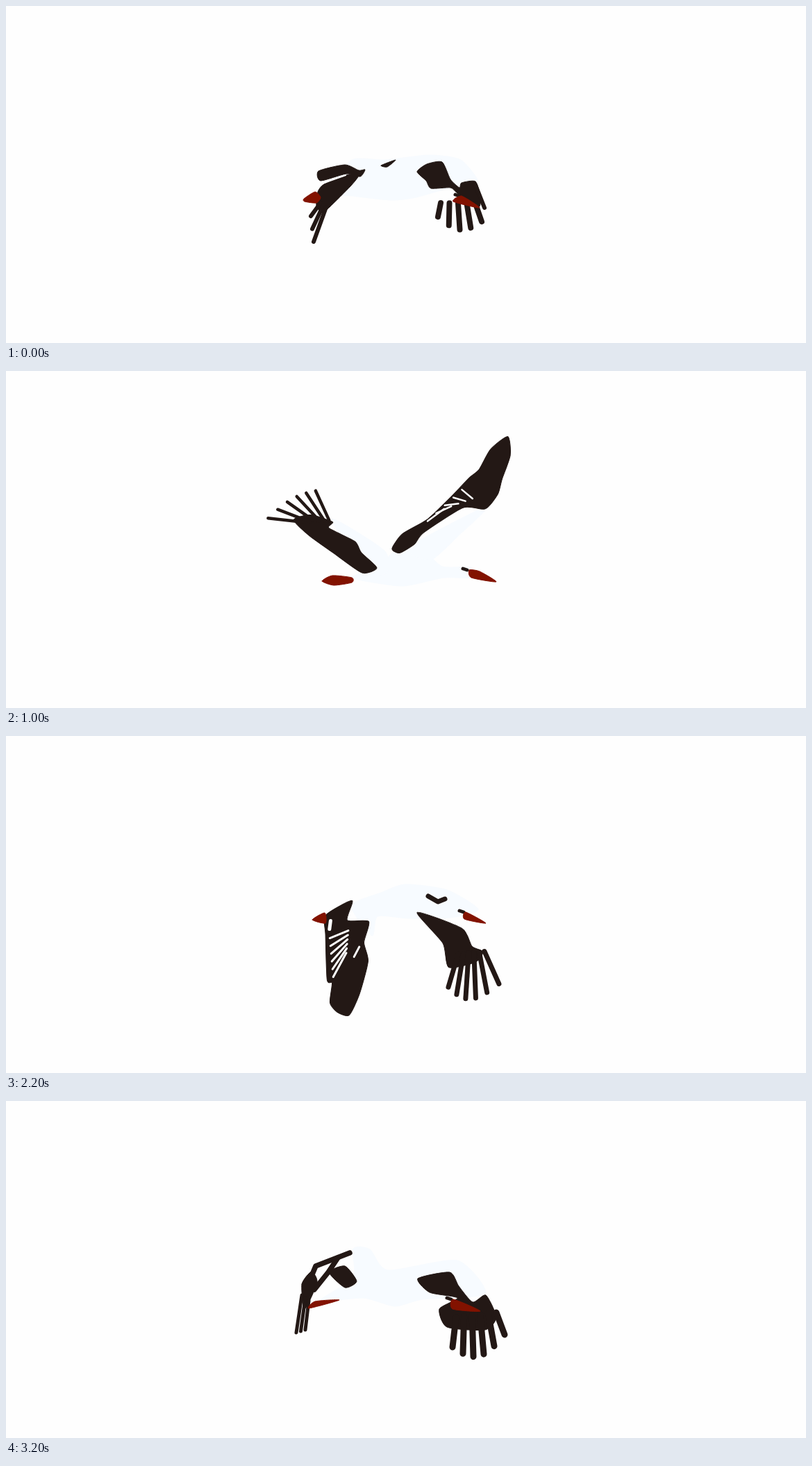
Write an HTML page with a canvas that moves like this. It is 1152x486 px and loops after 3.3 s.

```html
<!DOCTYPE html>
<html lang="en">
<head>
<meta charset="utf-8">
<title>Flying stork</title>
<style>
html, body { margin: 0; width: 100%; height: 100%; overflow: hidden; background: #fefefe; }
canvas { display: block; width: 100%; height: 100%; }
</style>
</head>
<body>
<canvas id="stage" width="1152" height="486"></canvas>
<script>
const ctx = document.getElementById('stage').getContext('2d');
const BLACK = '#231815', RED = '#821200', DOWN = '#f7fbff', PAPER = '#fefefe';
const STEP = 100;
const poses = {};

const mix = (a, b, k) => a + (b - a) * k;

// Closed shape through the given points, with softly rounded sides.
function blob(color, ...p) {
  const n = p.length, at = i => p[(i + n) % n];
  ctx.beginPath();
  ctx.moveTo(p[0], p[1]);
  for (let i = 0; i < n; i += 2) {
    const handle = (j, d) => at(j) + d * (at(j + 2) - at(j - 2)) / 9;
    ctx.bezierCurveTo(handle(i, 1), handle(i + 1, 1), handle(i + 2, -1), handle(i + 3, -1), at(i + 2), at(i + 3));
  }
  ctx.fillStyle = ctx.strokeStyle = color;
  ctx.lineWidth = 1;
  ctx.fill();
  ctx.stroke();
}

function line(color, width, ...p) {
  ctx.beginPath();
  for (let i = 0; i < p.length; i += 2) ctx.lineTo(p[i], p[i + 1]);
  ctx.strokeStyle = color;
  ctx.lineWidth = width;
  ctx.stroke();
}

// Spreads strokes evenly from the first root and tip to the last; sag lowers the middle tips.
function fan(color, count, width, sag, x1, y1, tx1, ty1, x2, y2, tx2, ty2) {
  for (let i = 0; i < count; i++) {
    const k = i / (count - 1);
    line(color, width, mix(x1, x2, k), mix(y1, y2, k),
      mix(tx1, tx2, k), mix(ty1, ty2, k) + sag * Math.sin(Math.PI * k));
  }
}

// The eye patch sits just behind the top of the bill.
function bill(x, y, ...rest) {
  line(BLACK, 5, x - 9, y - 2, x - 3, y);
  blob(RED, x, y, ...rest);
}

function wing(x, degrees, paint) {
  const y = 255;
  ctx.save();
  ctx.translate(x, y);
  ctx.rotate(degrees * Math.PI / 180);
  ctx.translate(-x, -y);
  paint();
  ctx.restore();
}

// Bill tip, natural lift of both wings, then the painters of each part.
function pose(name, x, y, left, right, parts) {
  poses[name] = { values: [left, right, x, y], ...parts };
}

pose('folded', 682, 290, -55, -50, {
  body() {
    blob(DOWN, 462, 268, 498, 222, 545, 222, 610, 215, 655, 222, 680, 255, 640, 262, 590, 276, 555, 280, 500, 274);
    blob(BLACK, 540, 230, 561, 222, 549, 232);
  },
  left() {
    blob(BLACK, 450, 238, 488, 229, 508, 237, 517, 236, 510, 246, 490, 242, 453, 252);
    blob(BLACK, 508, 244, 496, 260, 466, 290, 455, 298, 447, 288, 449, 268, 458, 257, 490, 244);
    line(PAPER, 2, 458, 255, 489, 244);
    fan(BLACK, 3, 6, 0, 453, 284, 439, 303, 461, 290, 443, 340);
  },
  right() {
    blob(BLACK, 592, 239, 606, 228, 628, 225, 640, 250, 653, 262, 656, 255, 676, 253, 683, 276, 680, 290, 650, 270, 640, 262, 612, 263, 605, 252);
    fan(BLACK, 5, 8, 15, 626, 284, 622, 304, 676, 285, 685, 311);
    line(BLACK, 6, 676, 258, 689, 291);
  },
  head() {
    bill(656, 274, 682, 291, 644, 282);
    blob(RED, 429, 278, 445, 268, 453, 276, 447, 284, 430, 282);
  }
});

pose('low', 691, 270, -82, -45, {
  body() {
    blob(DOWN, 497, 245, 540, 226, 575, 214, 635, 222, 680, 250, 640, 262, 580, 263, 535, 260, 527, 288);
    line(BLACK, 7, 608, 231, 622, 239, 632, 235);
  },
  left() {
    blob(BLACK, 460, 257, 499, 237, 491, 265, 522, 268, 514, 298, 519, 325, 505, 372, 489, 402, 472, 397, 462, 383, 466, 355, 459, 350, 459, 285);
    fan(PAPER, 6, 3, 0, 465, 290, 492, 280, 468, 346, 488, 312);
    line(PAPER, 5, 467, 265, 465, 277);
    line(PAPER, 3, 499, 318, 507, 304);
  },
  right() {
    blob(BLACK, 592, 255, 660, 263, 680, 285, 697, 289, 690, 306, 654, 322, 638, 290);
    fan(BLACK, 6, 7, 20, 663, 300, 660, 350, 699, 288, 730, 329);
  },
  head() {
    bill(662, 254, 691, 270, 660, 264);
    blob(RED, 441, 265, 459, 255, 460, 270);
  }
});

pose('sweep', 688, 283, -62, -12, {
  body() {
    blob(DOWN, 531, 238, 570, 226, 620, 236, 690, 275, 620, 262, 575, 273, 530, 278, 520, 304, 482, 304, 500, 262);
  },
  left() {
    blob(BLACK, 468, 265, 505, 249, 531, 238, 497, 268, 488, 298, 516, 308, 506, 332, 505, 358, 470, 395, 445, 410, 422, 398, 430, 372, 437, 325, 450, 290);
    line(PAPER, 5, 452, 295, 478, 292);
    fan(PAPER, 5, 3, 0, 441, 322, 477, 313, 442, 359, 476, 337);
    fan(PAPER, 2, 3, 0, 437, 381, 427, 405, 447, 378, 437, 410);
  },
  right() {
    line(BLACK, 6, 600, 268, 620, 275, 648, 276, 686, 290);
    blob(BLACK, 676, 288, 690, 284, 713, 290, 712, 303, 692, 308);
    line(BLACK, 7, 687, 271, 689, 284);
    fan(BLACK, 3, 5, 0, 694, 300, 706, 334, 708, 300, 733, 331);
    fan(BLACK, 3, 6, -4, 712, 300, 766, 331, 714, 304, 778, 299);
  },
  head() {
    bill(651, 265, 688, 283, 648, 278);
    blob(RED, 438, 266, 452, 256, 469, 263, 455, 270);
  }
});

pose('high', 706, 305, 27, 48, {
  body() {
    blob(DOWN, 497, 298, 535, 284, 560, 260, 600, 258, 628, 282, 670, 283, 670, 298, 630, 298, 570, 310);
  },
  left() {
    blob(DOWN, 468, 215, 545, 258, 550, 290, 520, 290);
    blob(BLACK, 413, 218, 437, 210, 469, 219, 464, 228, 502, 246, 512, 262, 535, 283, 514, 291, 472, 264, 436, 240);
    fan(BLACK, 6, 4.5, -8, 430, 221, 376, 217, 464, 217, 443, 175);
  },
  right() {
    blob(DOWN, 580, 255, 690, 190, 650, 235, 612, 272);
    blob(BLACK, 556, 258, 570, 236, 605, 213, 638, 178, 662, 150, 675, 138, 690, 108, 714, 88, 719, 115, 709, 150, 704, 172, 687, 194, 655, 194, 600, 233, 588, 250, 567, 264);
    fan(PAPER, 5, 2.5, 0, 605, 216, 628, 197, 652, 168, 668, 180);
  },
  head() {
    bill(667, 287, 682, 289, 706, 304, 670, 298);
    blob(RED, 455, 303, 470, 295, 498, 298, 498, 305, 472, 309);
  }
});

pose('rising', 682, 302, -5, 32, {
  body() {
    blob(DOWN, 480, 207, 505, 206, 545, 248, 605, 187, 655, 176, 600, 228, 595, 272, 646, 282, 646, 295, 560, 298, 480, 291, 490, 235);
  },
  left() {
    blob(BLACK, 377, 245, 400, 228, 445, 215, 483, 213, 492, 242, 508, 269, 484, 279, 440, 231, 405, 243, 378, 281, 376, 258, 390, 240);
  },
  right() {
    blob(BLACK, 531, 235, 565, 206, 604, 186, 568, 214, 546, 248);
    blob(BLACK, 622, 206, 637, 194, 632, 217);
    fan(BLACK, 3, 9, 0, 652, 188, 647, 209, 664, 180, 677, 191);
    line(BLACK, 9, 674, 156, 668, 170);
    line(BLACK, 6, 655, 174, 664, 180, 677, 160, 683, 177);
  },
  head() {
    bill(645, 284, 682, 302, 646, 296);
    blob(RED, 435, 291, 462, 287, 478, 291, 455, 302, 436, 300);
  }
});

pose('beating', 697, 260, -55, -36, {
  body() {
    blob(DOWN, 497, 238, 540, 217, 580, 206, 612, 222, 660, 238, 718, 315, 650, 280, 600, 254, 555, 250, 515, 266);
  },
  left() {
    blob(BLACK, 446, 282, 462, 246, 499, 234, 490, 267, 518, 272, 507, 300, 485, 340, 433, 371, 416, 360, 424, 322);
    fan(PAPER, 5, 3.5, 0, 451, 284, 482, 274, 439, 329, 475, 301);
    line(PAPER, 4, 458, 320, 470, 310);
  },
  right() {
    blob(BLACK, 582, 256, 605, 247, 658, 266, 690, 290, 708, 318, 722, 322, 689, 338, 665, 305, 625, 290, 600, 268);
    fan(BLACK, 5, 5.5, 8, 702, 325, 707, 368, 722, 323, 755, 358);
  },
  head() {
    bill(664, 241, 697, 260, 659, 254);
    blob(RED, 442, 254, 462, 248, 446, 264);
  }
});

pose('bent', 683, 303, -53, -54, {
  body() {
    blob(DOWN, 452, 288, 500, 255, 500, 213, 524, 214, 550, 244, 650, 230, 690, 278, 600, 286, 560, 296, 515, 284);
  },
  left() {
    line(BLACK, 7.5, 495, 219, 446, 238, 436, 262);
    line(BLACK, 7.5, 478, 226, 464, 247, 444, 272);
    blob(BLACK, 465, 247, 488, 238, 505, 260, 488, 269);
    blob(BLACK, 426, 264, 440, 246, 448, 262, 430, 300);
    fan(BLACK, 3, 5, 0, 426, 280, 418, 334, 436, 288, 431, 330);
  },
  right() {
    blob(BLACK, 593, 256, 639, 247, 652, 267, 672, 290, 691, 280, 706, 312, 690, 330, 635, 326, 624, 300, 650, 284, 610, 276);
    fan(BLACK, 6, 9, 22, 648, 312, 643, 355, 706, 305, 718, 337);
  },
  head() {
    bill(644, 286, 683, 303, 643, 300);
    blob(RED, 436, 299, 445, 289, 480, 287);
  }
});

// Each letter names the drawing used on one step.
const names = { A: 'folded', B: 'low', C: 'sweep', D: 'high', E: 'rising', F: 'beating', G: 'bent' };
const drawings = 'AAEDDDFBBEDDCCBAEDDDDFBGEEDDDFFGG';

// Wing beats: step, pose, and lifts where they differ from the pose.
const beats = [];
function beat(at, letter, left, right) {
  const [l, r, x, y] = poses[names[letter]].values;
  beats.push({ at, values: [left ?? l, right ?? r, x, y] });
}
beat(0, 'A');
beat(3, 'D', 27, 34);
beat(7, 'B');
beat(10, 'D', 29, 45);
beat(13, 'C');
beat(14, 'B', -84, -50);
beat(18, 'D');
beat(19, 'D', 32, 55);
beat(22, 'B', -84, -58);
beat(25, 'E');
beat(27, 'D', 28, 50);
beat(30, 'F');
beat(31, 'G', -66, -65);
beat(32, 'G');
beat(33, 'A');

function beatAt(step) {
  const i = beats.findIndex(b => b.at > step);
  const a = beats[i - 1], b = beats[i];
  const k = (1 - Math.cos(Math.PI * (step - a.at) / (b.at - a.at))) / 2;
  return a.values.map((v, n) => mix(v, b.values[n], k));
}

function draw(step) {
  const bird = poses[names[drawings[step]]];
  const [left, right, x, y] = beatAt(step).map((v, n) => v - bird.values[n]);
  ctx.fillStyle = PAPER;
  ctx.fillRect(0, 0, 1152, 486);
  ctx.save();
  ctx.translate(x, y);
  bird.body();
  wing(510, left, bird.left);
  wing(595, -right, bird.right);
  bird.head();
  ctx.restore();
}

ctx.lineCap = ctx.lineJoin = 'round';
const start = performance.now();
function tick() {
  const elapsed = Math.max(0, performance.now() - start);
  draw(Math.floor(elapsed / STEP) % drawings.length);
  requestAnimationFrame(tick);
}
tick();
</script>
</body>
</html>
```
